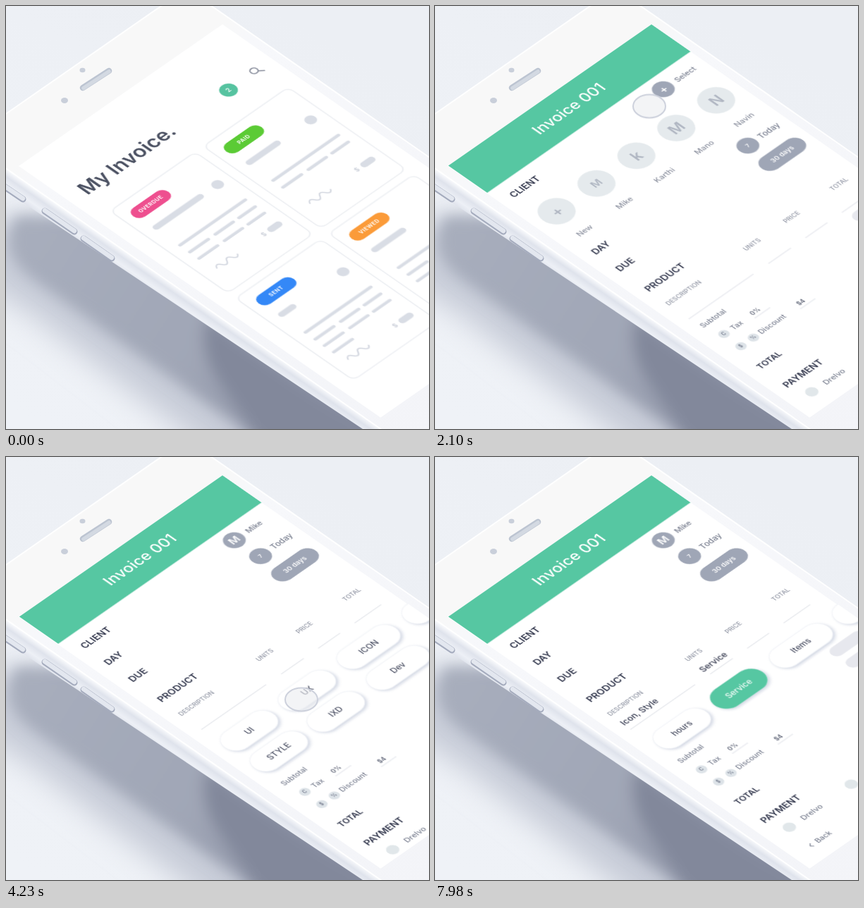
An HTML page for the animation above (8 s loop, 600 px wide and 600 px high).

```html
<!DOCTYPE html>
<html lang="en">
<head>
<meta charset="utf-8">
<title>Invoice app</title>
<style>
  html, body { margin: 0; width: 100%; height: 100%; overflow: hidden; background: #edf0f5; }
  svg { display: block; width: 100vw; height: 100vh; font-family: Inter, "Open Sans", sans-serif; }
  .raised { filter: drop-shadow(1px 3px 2px #d3d8e4); }
</style>
</head>
<body>
<svg id="stage" viewBox="0 0 600 600">
  <defs>
    <linearGradient id="backdrop" x1=".6" y1="0" x2=".1" y2="1">
      <stop offset="0" stop-color="#eceff4"/><stop offset=".5" stop-color="#eef1f6"/><stop offset="1" stop-color="#eff2f7"/>
    </linearGradient>
    <linearGradient id="shade" gradientUnits="userSpaceOnUse" x1="40" y1="320" x2="480" y2="600">
      <stop offset="0" stop-color="#a7adbc"/><stop offset=".55" stop-color="#a0a6b6"/><stop offset="1" stop-color="#858b9e"/>
    </linearGradient>
    <linearGradient id="side" gradientUnits="userSpaceOnUse" x1="200" y1="369" x2="182" y2="395">
      <stop offset="0" stop-color="#fafbfd"/><stop offset=".3" stop-color="#dfe3ec"/>
      <stop offset=".6" stop-color="#edf0f6"/><stop offset="1" stop-color="#d6dae5"/>
    </linearGradient>
    <linearGradient id="face" x1="0" y1="0" x2="0" y2="1">
      <stop offset="0" stop-color="#f8f8f8"/><stop offset=".09" stop-color="#f8f8f8"/><stop offset=".15" stop-color="#f7f8fb"/>
      <stop offset="1" stop-color="#f3f4f8"/>
    </linearGradient>
    <filter id="wide" x="-30%" y="-30%" width="160%" height="160%"><feGaussianBlur stdDeviation="22"/></filter>
    <filter id="soft" x="-30%" y="-30%" width="160%" height="160%"><feGaussianBlur stdDeviation="10"/></filter>
    <clipPath id="glass"><rect width="352.5" height="626"/></clipPath>
  </defs>
  <rect width="600" height="600" fill="url(#backdrop)"/>
  <path d="M-20 300L-40 390 40 440 300 640 700 700 500 560 120 300Z" fill="#c6cbd7" filter="url(#wide)"/>
  <g filter="url(#soft)">
    <path d="M15 298Q-18 350 45 392L330 596 420 680 700 700 500 560 120 300Z" fill="url(#shade)"/>
    <path d="M285 440Q268 490 310 545L390 660 640 700Z" fill="#82889b"/>
  </g>
  <path d="M-10 215L620 653V676L-10 256Z" fill="url(#side)"/>
  <g id="buttons" stroke-linecap="round"></g>
  <g id="plane" transform="matrix(.82 -.57 .82 .57 18 227)">
    <rect x="-14" y="-76" width="380" height="790" rx="50" fill="url(#face)" stroke="#fff" stroke-width="2"/>
    <rect width="352.5" height="626" fill="#fff"/>
    <g id="screen" clip-path="url(#glass)"></g>
  </g>
  <g fill="#c9cfda">
    <ellipse cx="83" cy="134" rx="5" ry="4"/><ellipse cx="108.500" cy="91" rx="4" ry="3.200"/>
    <path d="M109 116L146 92" stroke="#bcc4d1" stroke-width="8.500" stroke-linecap="round"/>
    <path d="M110 116.500L146 93" stroke="#d3d9e2" stroke-width="5.500" stroke-linecap="round"/>
  </g>
  <g id="cursor"><ellipse rx="23" ry="16.500" fill="#ecedf1" fill-opacity=".6" stroke="#cdd1dc" stroke-width="2"/></g>
</svg>
<script>
const LOOP = 8000;
const INK = '#2f344a', GREY = '#787e8f', SLATE = '#9fa6b6', MIST = '#e1e7ea', BAR = '#d9dde5', GREEN = '#56c7a2';
const SMOOTH = 'cubic-bezier(.4,0,.2,1)', OUT = 'cubic-bezier(.215,.61,.355,1)';
const byId = id => document.getElementById(id);

function add(parent, tag, attrs = {}, content) {
  const el = document.createElementNS('http://www.w3.org/2000/svg', tag);
  for (const key in attrs) el.setAttribute(key, attrs[key]);
  if (content) el.textContent = content;
  return parent.appendChild(el);
}
const group = (parent, attrs) => add(parent, 'g', attrs);
const dot = (parent, cx, cy, r, fill) => add(parent, 'circle', { cx, cy, r, fill });
const line = (parent, x1, x2, y, stroke = '#dcdfe6', width = 1, cap = 'butt') =>
  add(parent, 'path', { d: `M${x1} ${y}H${x2}`, stroke, 'stroke-width': width, 'stroke-linecap': cap });
const pill = (parent, cx, cy, w, h, fill) =>
  add(parent, 'rect', { x: cx - w / 2, y: cy - h / 2, width: w, height: h, rx: h / 2, fill });
// y is the middle of the capitals
const label = (parent, x, y, str, size, fill = GREY, weight = 500, anchor = 'middle') =>
  add(parent, 'text', { x, y: y + size * .36, 'font-size': size, fill, 'font-weight': weight, 'text-anchor': anchor }, str);

function play(el, steps, toFrame, ease) {
  const all = [[0, ...steps[0].slice(1)], ...steps, [LOOP, ...steps.at(-1).slice(1)]];
  el.animate(all.map(([t, ...v]) => ({ offset: t / LOOP, easing: ease, ...toFrame(v) })),
    { duration: LOOP, iterations: Infinity });
}
const move = (el, steps, ease = SMOOTH) =>
  play(el, steps, ([x, y]) => ({ transform: `translate(${x}px, ${y}px)` }), ease);
const fade = (el, steps, ease = 'linear') => play(el, steps, ([opacity]) => ({ opacity }), ease);

// Side buttons
for (const [x1, y1, x2, y2] of [[-4, 255, 24, 274], [55, 291, 97, 320], [110, 330, 150, 358]]) {
  const d = `M${x1} ${y1}L${x2} ${y2}`;
  add(byId('buttons'), 'path', { d, stroke: '#a4abbd', 'stroke-width': 9 });
  add(byId('buttons'), 'path', { d, stroke: '#e3e7ef', 'stroke-width': 6.5, transform: 'translate(0 -1)' });
}

const screen = byId('screen');

// Invoice list
const home = group(screen);
label(home, 23, 86, 'My Invoice.', 28, '#4b5162', 600, 'start');
dot(home, 276, 87, 11.5, '#56c3a0');
label(home, 276, 87, '2', 9, '#fff', 600);
add(home, 'path', { d: 'M326 89L332 94M327 85a5 5 0 1 0-10 0a5 5 0 1 0 10 0', fill: 'none', stroke: '#8b909e', 'stroke-width': 1.8 });

function card(x, y, status, color, titleWidth, rows) {
  const g = group(home, { transform: `translate(${x} ${y})` });
  const foot = rows > 2 ? 172 : 162;
  add(g, 'rect', { width: 147, height: 204, rx: 9, fill: '#fff', stroke: '#eceef2', 'stroke-width': 1.6 });
  pill(g, 44, 26.5, 61, 21, color);
  label(g, 44, 26.5, status, 7.5, '#fff', 700).setAttribute('letter-spacing', .5);
  dot(g, 126, 60, 7.8, BAR);
  line(g, 20, 11 + titleWidth, 60, BAR, 9, 'round');
  line(g, 18, 131, 103, BAR, 4.6, 'round');
  for (let i = 0; i < rows; i++)
    for (const [a, b] of [[18, 50], [62, 93], [103, 131]])
      if (i < 2 || a < 50) line(g, a, b, 120 + i * 16, BAR, 4.6, 'round');
  label(g, 104, foot, '$', 9, '#c6cbd6', 600);
  line(g, 117, 129, foot, BAR, 10, 'round');
  add(g, 'path', { d: `M21 ${foot + 2}q4-9 9-1t9 0t9 0t9 0`, fill: 'none', stroke: '#d3d7e0', 'stroke-width': 1.8 });
}
card(23, 135, 'OVERDUE', '#ee4f8f', 85, 2);
card(184, 135, 'PAID', '#5bcb35', 57, 1);
card(23, 352, 'SENT', '#3488f7', 28, 3);
card(184, 352, 'VIEWED', '#fb9b39', 57, 2);
move(home, [[250, 0, 0], [800, -80, 0]]);
fade(home, [[250, 1], [750, 0]]);

// Invoice form
const form = group(screen);
move(form, [[600, 0, 420], [1395, 0, 0]], OUT);
fade(form, [[600, 0], [1000, 1]]);
add(form, 'rect', { width: 352.5, height: 67.5, fill: GREEN });
label(form, 176, 33.5, 'Invoice 001', 21.5, '#fff');

const heading = (parent, y, str, size = 13) => label(parent, 17.5, y, str, size, INK, 600, 'start');
heading(form, 92, 'CLIENT');

function clientTag(sign, size, name) {
  const g = group(form);
  dot(g, 282, 91, 14, SLATE);
  label(g, 282, 91, sign, size, '#fff', 600);
  label(g, 303, 91, name, 11, GREY, 500, 'start');
  return g;
}
fade(clientTag('+', 16, 'Select'), [[2700, 1], [2880, 0]]);
const chosen = clientTag('M', 15, 'Mike');
move(chosen, [[2850, -110, 45], [3300, 0, 0]]);
fade(chosen, [[2850, 0], [3050, 1]]);

const clients = group(form);
[['+', 'New'], ['M', 'Mike'], ['k', 'Karthi'], ['M', 'Mano'], ['N', 'Navin']].forEach(([sign, name], i) => {
  const x = 38 + i * 69;
  dot(clients, x, 151, 23.3, MIST);
  label(clients, x, 151, sign, i === 1 ? 15 : 21, '#a3abb9', 600);
  label(clients, x, 199, name, 11);
});
move(clients, [[1750, 0, -20], [2200, 0, 0], [2750, 0, 0], [3050, 0, -20]]);
fade(clients, [[1800, 0], [2150, 1], [2750, 1], [2980, 0]]);

// Everything under the client row
const details = group(form);
move(details, [[1700, 0, 0], [2250, 0, 106], [2750, 0, 106], [3300, 0, 0]]);
heading(details, 133, 'DAY');
dot(details, 285, 133.5, 14, SLATE);
label(details, 285, 133.5, '7', 8, '#fff', 600);
label(details, 305, 133, 'Today', 11.5, GREY, 500, 'start');
heading(details, 175.5, 'DUE');
pill(details, 304, 174, 71, 28, SLATE);
label(details, 304, 174, '30 days', 9.5, '#fff', 600);
heading(details, 225, 'PRODUCT');
label(details, 17.5, 261, 'DESCRIPTION', 8.6, '#8d92a1', 500, 'start');
[['UNITS', 165.5], ['PRICE', 234], ['TOTAL', 316]].forEach(([str, x]) => label(details, x, 260.5, str, 8.6, '#8d92a1'));
for (const [a, b] of [[18, 130], [156, 195], [220, 258], [283, 329]]) line(details, a, b, 298);
const product = label(details, 17.5, 284, 'Icon, Style', 12, INK, 500, 'start');
fade(product, [[5150, 0], [5300, 1]]);
const unit = label(details, 152, 286, 'Service', 12, INK, 500, 'start');
fade(unit, [[7480, 0], [7620, 1]]);

function option(parent, x, y, w, str, pickedAt) {
  const raised = pill(parent, x, y, w, 39, '#fff');
  raised.setAttribute('class', 'raised');
  raised.setAttribute('stroke', '#f0f2f6');
  label(parent, x, y, str, 11.5, '#474c60');
  if (!pickedAt) return;
  const picked = group(parent);
  pill(picked, x, y, w, 40, GREEN);
  label(picked, x, y, str, 11.5, '#fff');
  fade(picked, [[pickedAt, 0], [pickedAt + 120, 1]]);
}
const skills = group(details), units = group(details);
option(skills, 58, 340.5, 84, 'UI');
option(skills, 158, 340.5, 84, 'UX');
option(skills, 265.5, 339.5, 94, 'ICON', 4650);
option(skills, 373, 339.5, 84, '');
option(skills, 58, 392, 84, 'STYLE', 5050);
option(skills, 156.5, 392, 84, 'IXD');
option(skills, 265, 391, 94, 'Dev');
move(skills, [[3550, 0, -20], [4000, 0, 0], [5300, 0, 0], [5600, 0, -20]]);
fade(skills, [[3600, 0], [3950, 1], [5300, 1], [5550, 0]]);
option(units, 64, 341, 84, 'hours');
option(units, 162.5, 341, 83, 'Service', 7420);
option(units, 270, 341, 94, 'Items');
option(units, 374, 341, 84, '');
move(units, [[6780, 0, -20], [7200, 0, 0]]);
fade(units, [[6820, 0], [7150, 1]]);

// Sums and payment, pushed down by open option rows
const sums = group(details);
move(sums, [[3500, 0, -7], [4000, 0, 111], [5350, 0, 111], [5900, 0, 0], [6750, 0, 0], [7250, 0, 55]]);
label(sums, 19.5, 325, 'Subtotal', 10.3, GREY, 500, 'start');
label(sums, 43, 354, 'Tax', 10.3, GREY, 500, 'start');
label(sums, 62, 383.5, 'Discount', 10.3, GREY, 500, 'start');
for (const [x, y, sign] of [[30, 354, 'C'], [29.5, 384, '$'], [51, 384, '%']]) {
  dot(sums, x, y, 7, '#dde3e8');
  label(sums, x, y, sign, 7, '#70778a', 600);
}
label(sums, 85, 353, '0%', 8.5, '#5b6174', 600);
line(sums, 76, 103, 361);
label(sums, 136, 381, '$4', 8.5, '#5b6174', 600);
line(sums, 127, 153, 389);
for (const y of [324, 352, 383]) pill(sums, 313, y, 56, 18, '#e7e8ee');
pill(sums, 288, 426, 105, 19, '#e7e8ee');
heading(sums, 426, 'TOTAL', 11.8);
heading(sums, 472, 'PAYMENT');
[['Drelvo', 34], ['Quolda', 141]].forEach(([name, x]) => {
  dot(sums, x, 502, 8.2, MIST);
  label(sums, x + 21, 502, name, 11, GREY, 500, 'start');
});
const back = group(sums);
add(back, 'path', { d: 'M32 600l-3.500 3.500l3.500 3.500', fill: 'none', stroke: GREY, 'stroke-width': 1.1 });
label(back, 39, 603, 'Back', 10.5, GREY, 500, 'start');
move(back, [[6750, 0, 0], [7250, 0, -60]]);

// Touch point
const cursor = byId('cursor');
move(cursor, [
  [1450, 385, 150], [1650, 349, 92], [1850, 349, 92], [2490, 208, 249], [2580, 226, 252], [2700, 226, 252],
  [3120, 344, 376], [3300, 304, 368], [3600, 304, 368], [4230, 419, 344], [4560, 513, 269], [4720, 513, 269],
  [5020, 387, 417], [5250, 387, 417], [6450, 402, 278], [6600, 394, 290], [6800, 394, 290], [7350, 431, 329]
], 'ease-in-out');
fade(cursor, [[1450, 0], [1560, 1], [7500, 1], [7720, 0]]);
</script>
</body>
</html>
```
